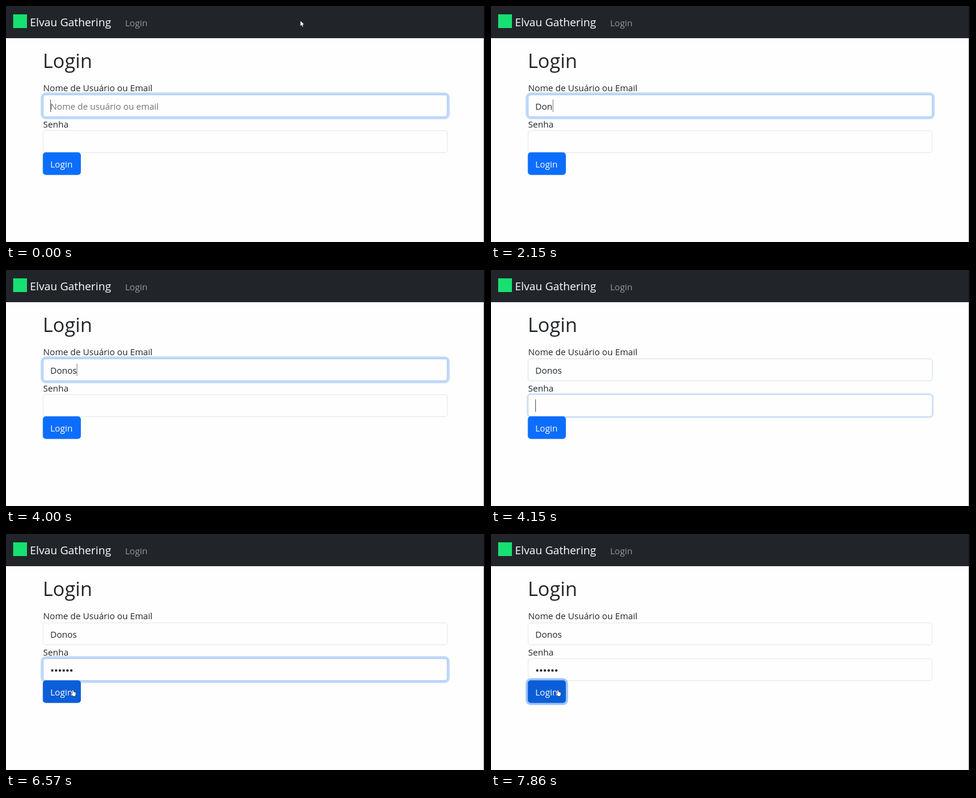
Recreate the animation shown at these times as an HTML page with a canvas. Size 800 px wide and 396 px high, loop 8000 ms.

```html
<!DOCTYPE html>
<html lang="pt">
<head>
<meta charset="utf-8">
<title>Login</title>
<style>
  html, body { margin: 0; width: 100%; height: 100%; overflow: hidden; background: #fefefe; }
  canvas { display: block; width: 800px; height: 396px; }
</style>
</head>
<body>
<canvas id="stage"></canvas>
<script>
const W = 800, H = 396, LOOP = 8000;
const canvas = document.getElementById('stage');
const ctx = canvas.getContext('2d');
const dpr = window.devicePixelRatio || 1;
canvas.width = W * dpr;
canvas.height = H * dpr;

const FAMILY = '"Open Sans", "Noto Sans", sans-serif';
const BODY = `14.65px ${FAMILY}`;
const INK = '#212529';
const PAPER = '#fefefe';
const USER = 'Donos';

// Each step changes part of the state; focus values run from 0 to 1.
const steps = [
  [0, { typed: 0, dots: 0, caret: 'user', arrow: true, hand: false, hover: 0,
        userFocus: 1, passFocus: 0, buttonFocus: 0 }],
  [150, { arrow: false }],
  [290, { caret: '' }],
  [860, { caret: 'user' }],
  [1430, { caret: '' }],
  [1860, { typed: 1, caret: 'user' }],
  [2000, { typed: 2 }],
  [2150, { typed: 3 }],
  [2570, { typed: 4 }],
  [2720, { typed: 5 }],
  [3430, { caret: '' }],
  [4000, { caret: 'user' }],
  [4150, { caret: 'pass', userFocus: 0.08, passFocus: 0.5 }],
  [4290, { userFocus: 0, passFocus: 1 }],
  [4570, { dots: 1 }],
  [4860, { dots: 2 }],
  [5000, { dots: 3 }],
  [5430, { dots: 4 }],
  [5570, { dots: 5 }],
  [5720, { dots: 6 }],
  [6150, { caret: '' }],
  [6430, { hand: true, hover: 0.5 }],
  [6570, { hover: 1 }],
  [6720, { passFocus: 0.4, buttonFocus: 0.5 }],
  [6860, { passFocus: 0, buttonFocus: 1 }]
];

function stateAt(time) {
  const past = steps.filter(([start]) => start <= time);
  return Object.assign({}, ...past.map(([, change]) => change));
}

function mix(from, to, amount) {
  const parts = from.map((v, i) => Math.round(v + (to[i] - v) * amount));
  return `rgb(${parts})`;
}

function text(value, x, baseline, color = INK, font = BODY) {
  ctx.font = font;
  ctx.fillStyle = color;
  ctx.fillText(value, x, baseline);
}

function box(x, y, w, h, radius, color) {
  ctx.fillStyle = color;
  ctx.beginPath();
  ctx.roundRect(x, y, w, h, radius);
  ctx.fill();
}

function ring(x, y, w, h, focus, color) {
  if (!focus) return;
  const spread = 3.6 * focus;
  ctx.globalAlpha = 0.4 + 0.6 * focus;
  box(x - spread, y - spread, w + 2 * spread, h + 2 * spread, 5 + spread, color);
  ctx.globalAlpha = 1;
}

function field(y, focus) {
  ring(61.5, y, 676, 38, focus, '#c4dafa');
  box(61.5, y, 676, 38, 5, mix([226, 229, 234], [150, 192, 248], focus));
  box(62.5, y + 1, 674, 36, 4, PAPER);
}

function caret(x, y, color) {
  ctx.fillStyle = color;
  ctx.fillRect(x, y, 1, 21);
}

function outlined(points, x, y) {
  ctx.beginPath();
  points.forEach(([dx, dy]) => ctx.lineTo(x + dx, y + dy));
  ctx.closePath();
  ctx.lineJoin = 'round';
  ctx.lineWidth = 1;
  ctx.strokeStyle = '#111417';
  ctx.stroke();
  ctx.fillStyle = '#fff';
  ctx.fill();
}

function navbar() {
  ctx.fillStyle = INK;
  ctx.fillRect(0, 0, W, 54);
  ctx.fillStyle = '#17e072';
  ctx.fillRect(12, 14, 23, 23);
  text('Elvau Gathering', 40, 34.4, '#fff', `18.4px ${FAMILY}`);
  text('Login', 199, 33.5, '#95989a');
}

function userField(s) {
  field(148.5, s.userFocus);
  const value = USER.slice(0, s.typed);
  if (value) text(value, 74, 173.5);
  else text('Nome de usuário ou email', 74, 173.5, '#6c757d');
  if (s.caret === 'user') {
    const width = ctx.measureText(value).width;
    caret(Math.round(74 + width), 157, s.typed ? '#808488' : '#50555a');
  }
}

function passwordField(s) {
  field(208.5, s.passFocus);
  ctx.fillStyle = INK;
  for (let i = 0; i < s.dots; i++) {
    ctx.beginPath();
    ctx.arc(77.3 + 6.35 * i, 229, 2.1, 0, Math.PI * 2);
    ctx.fill();
  }
  if (s.caret === 'pass') {
    caret(s.dots ? Math.round(74.5 + 6.35 * s.dots) : 74, 217, '#50555a');
  }
}

function button(s) {
  ring(61.5, 245.5, 63.5, 38, s.buttonFocus, '#9fc5fa');
  box(61.5, 245.5, 63.5, 38, 5, mix([13, 110, 253], [11, 94, 215], s.hover));
  text('Login', 74, 270.5, '#fff');
}

function draw(time) {
  const s = stateAt(time);
  ctx.setTransform(dpr, 0, 0, dpr, 0, 0);
  ctx.fillStyle = PAPER;
  ctx.fillRect(0, 0, W, H);

  navbar();
  text('Login', 61.5, 104, INK, `500 32.5px ${FAMILY}`);
  text('Nome de Usuário ou Email', 62, 143);
  userField(s);
  text('Senha', 62, 203.5);
  passwordField(s);
  button(s);

  ctx.fillStyle = '#0c0e10';
  ctx.fillRect(798, 0, 2, H);

  if (s.arrow) {
    outlined([[0, 0], [0, 8.5], [2, 6.8], [3.4, 9.8], [4.6, 9.2], [3.3, 6.3], [6, 6.1]], 491.8, 25);
  }
  if (s.hand) {
    outlined([[0, 0], [1.5, 0], [2, 3], [5.5, 4], [5.8, 6], [4.7, 10], [1, 10], [-1.5, 6.2], [0, 6]], 110.8, 262);
  }
}

function tick() {
  draw(performance.now() % LOOP);
  requestAnimationFrame(tick);
}
tick();
</script>
</body>
</html>
```
